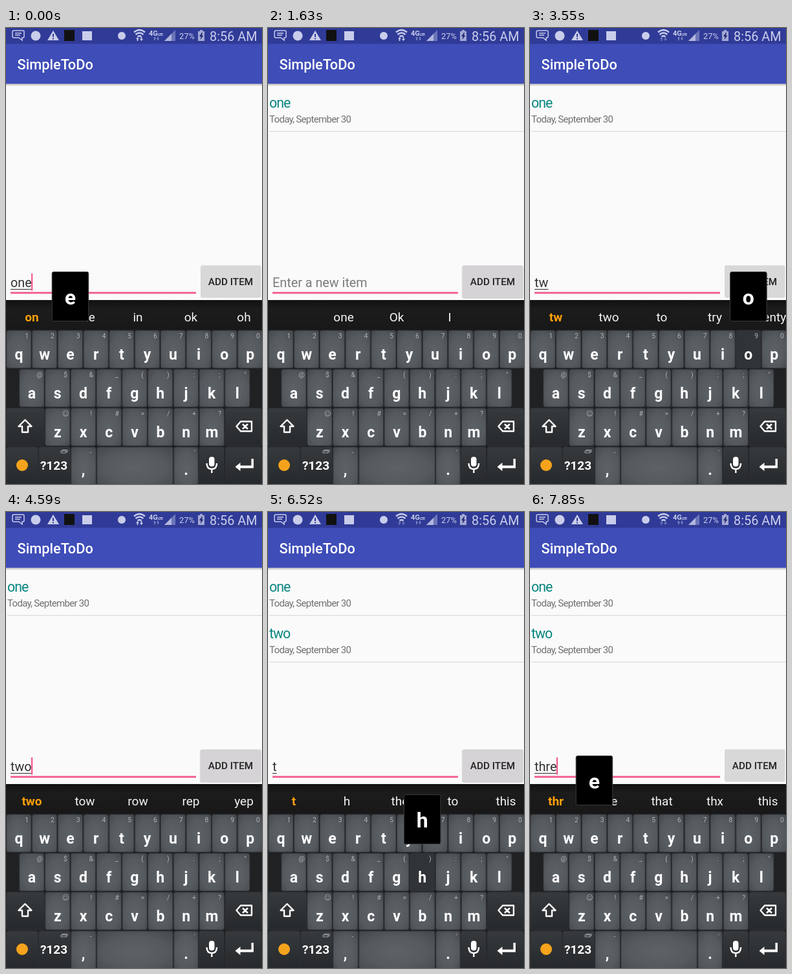
These frames come from a looping animation (396x704 px, 8000 ms). An HTML page:

```html
<!DOCTYPE html>
<html lang="en">
<head>
<meta charset="utf-8">
<title>Todo list</title>
<style>
  html, body { margin: 0; width: 100%; height: 100%; overflow: hidden; background: #fafafa; }
  svg { display: block; width: 100%; height: 100%; font-family: Roboto, sans-serif; }
  .mid { text-anchor: middle; }
  .key { font-weight: 700; font-size: 23px; fill: #fff; }
  .alt { font: 10.5px Roboto, "DejaVu Sans", sans-serif; fill: #b0b3b5; }
  .word { font-size: 19px; fill: #f4f4f4; }
  .best { font-weight: 700; fill: #ff9f0a; }
  .line { fill: none; stroke: #fff; stroke-width: 2.4; stroke-linejoin: round; }
  .typed { font-size: 19.8px; fill: #333; }
  .name { font-size: 21.3px; letter-spacing: -1px; fill: #07857f; }
  .date { font-size: 15px; letter-spacing: -.7px; fill: #707070; }
</style>
</head>
<body>
<svg viewBox="0 0 396 704" xmlns="http://www.w3.org/2000/svg">
  <defs>
    <radialGradient id="light" cy=".55" r=".75"><stop stop-color="#5d6267"/><stop offset=".55" stop-color="#555a5f"/><stop offset="1" stop-color="#43474b"/></radialGradient>
    <linearGradient id="dark" x2="0" y2="1"><stop stop-color="#363a3d"/><stop offset="1" stop-color="#26292c"/></linearGradient>
    <linearGradient id="shade" x2="0" y2="1"><stop stop-color="#888" stop-opacity=".65"/><stop offset="1" stop-color="#888" stop-opacity="0"/></linearGradient>
    <linearGradient id="bar" x2="0" y2="1"><stop stop-color="#111"/><stop offset=".3" stop-color="#1c1c1c"/><stop offset="1" stop-color="#181818"/></linearGradient>
  </defs>

  <rect width="396" height="704" fill="#fafafa"/>
  <rect y="86" width="396" height="4" fill="url(#shade)"/>
  <rect y="24" width="396" height="62" fill="#3f4db8"/>
  <rect width="396" height="24.5" fill="#303b98"/>
  <text x="17.5" y="64" font-size="21.8" font-weight="500" fill="#fff">SimpleToDo</text>

  <g id="status" fill="#c9cdea">
    <path d="M12 4h14q2 0 2 2v7q0 2-2 2h-1v4l-5-4h-8q-2 0-2-2v-7q0-2 2-2zM14 8h10M14 11h8" fill="none" stroke="#c9cdea" stroke-width="1.5"/>
    <circle cx="46" cy="12" r="7.5"/>
    <path d="M73 4l9 15h-18z"/>
    <path d="M73 9v5M73 15.5v2" stroke="#303b98" stroke-width="2"/>
    <rect x="90" y="3" width="16" height="17" fill="#111"/>
    <rect x="118" y="5" width="15" height="14"/>
    <circle cx="179" cy="12" r="6"/>
    <path d="M198 6.5q8.500-7 17 0M200.500 10q6-5 12 0M203.500 13.300q3-2.300 6 0" fill="none" stroke="#c9cdea" stroke-width="2.400"/>
    <text x="221" y="12" font-size="11" font-weight="700">4G</text>
    <text x="235" y="11.5" font-size="6" font-weight="700" letter-spacing="-.8">LTE</text>
    <path id="arrows" d="M201 17l2.500-3 2.500 3h-1.600v3h-1.800v-3zM207 17h1.600v-3h1.800v3h1.600l-2.500 3z"/>
    <path d="M228 16l2-2.500 2 2.500h-1.200v3h-1.600v-3zM233 16.500h1.200v-3h1.600v3h1.200l-2 2.500z" opacity=".55"/>
    <path d="M262 3v17h-17z" opacity=".4"/>
    <path d="M256 9v11h-11z" opacity=".75"/>
    <text x="268" y="17" font-size="12.800">27%</text>
    <path d="M300 3h4v2h3v15h-10v-15h3z" opacity=".75"/>
    <path d="M303 7l-4 6h2.500l-1 5 5-6.500h-2.500l1-4.500z" fill="#222a70"/>
    <text x="315" y="19.500" font-size="19.900">8:56 AM</text>
  </g>

  <g id="list"></g>

  <text id="field" x="7" y="400"></text>
  <rect id="underline" x="7" y="402.9" height="1.2" fill="#444"/>
  <rect x="7" y="407.5" width="287" height="2.8" fill="#f4588f"/>
  <rect id="cursor" y="379" width="2.2" height="26.500" fill="#f4588f"/>
  <g id="glow" fill="#777">
    <rect x="299.500" y="367" width="96" height="51" rx="3" opacity=".12"/>
    <rect x="300.500" y="367" width="94" height="50.500" rx="3" opacity=".25"/>
  </g>
  <rect id="button" x="301" y="366.500" width="93.500" height="50" rx="2.500"/>
  <text class="mid" x="347.500" y="397" font-size="15.300" font-weight="500" fill="#222">ADD ITEM</text>

  <rect y="420" width="396" height="284" fill="#1f2122"/>
  <rect y="420" width="396" height="46" fill="url(#bar)"/>
  <g id="words"></g>
  <g id="keys"></g>
  <g id="icons">
    <path class="line" d="M29.500 605l10 10h-5.500v9h-9v-9h-5.500z"/>
    <path class="line" d="M363 607.500h17v15h-17l-6.500-7.500zM366 611.500l8 7.500M374 611.500l-8 7.500"/>
    <circle cx="25" cy="675" r="9" fill="#f5a31c"/>
    <path d="M85 656v-3h2v-1.500h8v3h-2v1.500zM87 653h6v2" fill="none" stroke="#a6a9ab"/>
    <rect x="314" y="662" width="8.500" height="15" rx="4" fill="#fff"/>
    <path class="line" d="M310.500 672q0 9 7.800 9t7.800-9M318.300 681v6"/>
    <path d="M379.500 665v10.500h-17v-4.500l-8 6.500 8 6.500v-4.500h20.500v-14.500z" fill="#fff"/>
  </g>
  <g id="popup">
    <rect width="56.500" height="76" rx="2.500" fill="#000" stroke="#3a3a3a"/>
    <text class="mid" x="28.200" y="50.500" font-size="32" font-weight="700" fill="#fff"></text>
  </g>
</svg>

<script>
const $ = id => document.getElementById(id);
const LOOP = 8000;
const PITCH = 39.75;
const ROWS = [
  { y: 467, x: 0, keys: "qwertyuiop", alts: "1234567890" },
  { y: 527, x: 20, keys: "asdfghjkl", alts: "@$&_():;\"" },
  { y: 587, x: 60, keys: "zxcvbnm", alts: "☺!#=/+?" }
];
const keyAt = {};

const label = (x, y, text, cls) => `<text class="mid ${cls}" x="${x}" y="${y}">${text}</text>`;
const cap = (x, y, w, fill, id = "") =>
  `<rect ${id && `id="${id}"`} x="${x + .8}" y="${y}" width="${w - 1.6}" height="58" rx="3" fill="url(#${fill})" stroke="#34373a" stroke-width=".8"/>`;

function buildKeys() {
  let out = "";
  for (const row of ROWS) {
    [...row.keys].forEach((k, i) => {
      const x = row.x + i * PITCH, mid = x + PITCH / 2;
      keyAt[k] = { x: mid, y: row.y };
      out += cap(x, row.y, PITCH, "light", "key-" + k)
        + label(mid, row.y + 44.5, k, "key")
        + label(mid + 12.3, row.y + 12, row.alts[i], "alt");
    });
  }
  out += cap(0, 587, 60, "dark") + cap(338.5, 587, 57.5, "dark");
  const bottom = [[0, 50, "dark"], [50, 50, "dark"], [100, 40, "light"], [140, 119, "light"],
    [259, 39, "light"], [298, 40, "dark"], [338.5, 57.5, "dark"]];
  for (const [x, w, fill] of bottom) out += cap(x, 647, w, fill);
  out += `<text class="mid" x="74" y="682" font-size="19" font-weight="700" fill="#fff">?123</text>`
    + label(119.5, 690, ",", "key") + label(278.5, 690, ".", "key")
    + label(131, 659, "-", "alt") + label(292, 659, "'", "alt");
  $("keys").innerHTML = out;
}

function buildList() {
  $("list").innerHTML = ["one", "two"].map((name, i) => `<g transform="translate(0 ${72 * i})">
    <text class="name" x="2" y="122.5">${name}</text>
    <text class="date" x="2" y="145.5">Today, September 30</text>
    <rect x="2" y="159" width="394" height="1.2" fill="#dadada"/></g>`).join("");
}

const AFTER_ADD = " one Ok I";
const AFTER_T = "t h the to this";

// Each step changes only the named parts of the screen.
const STEPS = [
  [0, { text: "one", cursor: 1, words: "on one in ok oh", popup: "e", down: "", items: 0, pressed: 0, arrows: 1 }],
  [150, { popup: "" }],
  [290, { words: "one in on ok ones", arrows: 0 }],
  [590, { cursor: 0 }],
  [1030, { cursor: 1, pressed: 1 }],
  [1180, { text: "", items: 1, arrows: 1 }],
  [1330, { words: AFTER_ADD }],
  [1630, { cursor: 0 }],
  [2070, { cursor: 1, popup: "t", down: "t", arrows: 0 }],
  [2220, { text: "t", down: "" }],
  [2370, { popup: "", words: AFTER_T, arrows: 1 }],
  [2820, { text: "tw", popup: "w", pressed: 0 }],
  [2960, { popup: "", words: "tw two to try twenty" }],
  [3260, { cursor: 0, arrows: 0 }],
  [3410, { popup: "o", down: "o" }],
  [3560, { text: "two", cursor: 1, down: "" }],
  [3700, { popup: "", words: "two tow row rep yep" }],
  [4150, { cursor: 0 }],
  [4450, { pressed: 1, arrows: 1 }],
  [4590, { cursor: 1 }],
  [4740, { text: "", items: 2 }],
  [4880, { words: AFTER_ADD }],
  [5180, { cursor: 0 }],
  [5330, { arrows: 0 }],
  [5630, { cursor: 1 }],
  [5780, { popup: "t", down: "t" }],
  [5930, { text: "t", down: "" }],
  [6080, { popup: "", words: AFTER_T }],
  [6370, { cursor: 0 }],
  [6520, { popup: "h", down: "h" }],
  [6670, { text: "th", cursor: 1, down: "", pressed: 0 }],
  [6820, { popup: "", words: "th the this that they" }],
  [7260, { popup: "r", down: "r", cursor: 0 }],
  [7410, { text: "thr", cursor: 1, popup: "", down: "", words: "thr the that thx this" }],
  [7850, { text: "thre", popup: "e" }]
];

const show = (node, on) => node.setAttribute("visibility", on ? "visible" : "hidden");

function renderWords(words) {
  const shifted = words.startsWith(" ");
  $("words").innerHTML = words.trim().split(" ").map((w, i) =>
    label((shifted ? 117 : 40) + 82 * i, 452.5, w, !shifted && i === 0 ? "word best" : "word")).join("");
}

function render(s) {
  const field = $("field");
  field.textContent = s.text || "Enter a new item";
  field.setAttribute("class", "typed");
  field.style.fill = s.text ? "" : "#7b7b7b";
  const width = s.text ? field.getComputedTextLength() : 0;
  $("underline").setAttribute("width", width);
  $("cursor").setAttribute("x", 6.8 + (s.text ? width - .4 : 0));
  show($("cursor"), s.cursor);

  [...$("list").children].forEach((item, i) => show(item, i < s.items));
  $("button").setAttribute("fill", s.pressed ? "#d6d3d6" : "#d8d8d8");
  show($("glow"), s.pressed);
  $("arrows").setAttribute("opacity", s.arrows ? 1 : .4);
  renderWords(s.words);

  for (const k in keyAt) $("key-" + k).setAttribute("fill", s.down === k ? "#303438" : "url(#light)");
  const popup = $("popup");
  show(popup, s.popup);
  if (s.popup) {
    const { x, y } = keyAt[s.popup];
    popup.setAttribute("transform", `translate(${x - 28.2} ${y - 90.5})`);
    popup.querySelector("text").textContent = s.popup;
  }
}

let shown = -1;
function tick() {
  const t = performance.now() % LOOP;
  const count = STEPS.filter(([at]) => at <= t).length;
  if (count !== shown) {
    shown = count;
    render(Object.assign({}, ...STEPS.slice(0, count).map(step => step[1])));
  }
  requestAnimationFrame(tick);
}

buildKeys();
buildList();
tick();
</script>
</body>
</html>
```
